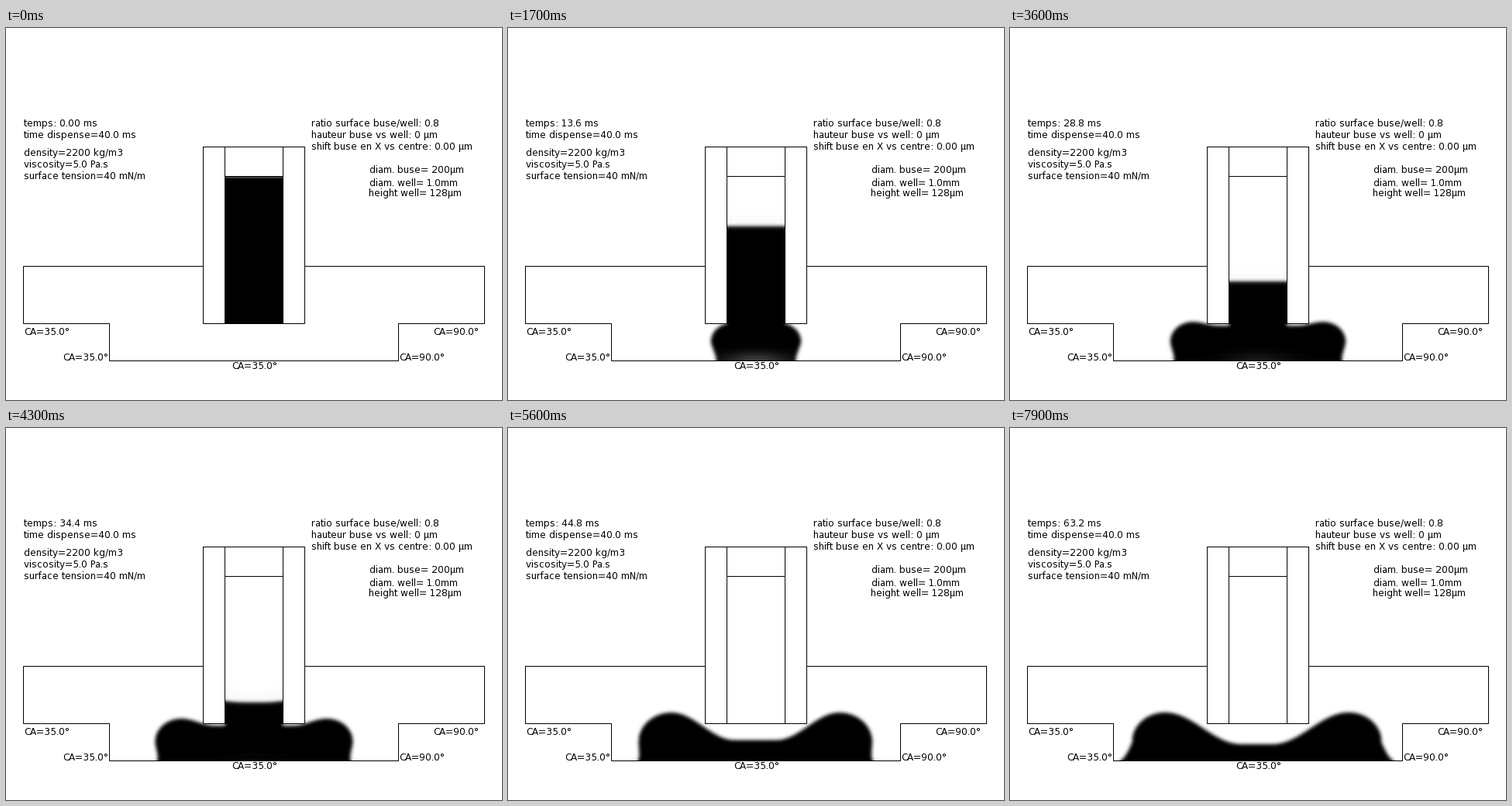
A matplotlib script that plays this animation: 640 by 480 pixels, repeating every 8000 ms.

```python
import numpy as np
import matplotlib.pyplot as plt
from matplotlib.animation import FuncAnimation

W, H, DPI = 640, 480, 100
FRAMES, STEP = 80, 100
TOP, LIP, FLOOR = 191, 381, 429   # initial level, nozzle outlet, well bottom
BORE, NOZZLE, WELL = 37.5, 65.5, 186
DRAINED = 5000                    # ms at which the nozzle is empty

plt.rcParams["text.hinting_factor"] = 1   # whole-pixel letter spacing

yy, xx = np.mgrid[0:H, 0:W] + 0.5
dx = np.abs(xx - 320)
above_lip = yy < LIP + 0.5
in_bore = (dx < BORE) & (yy > TOP + 0.5) & above_lip
walls = (dx > BORE) & (dx < NOZZLE) & above_lip
domain = ~walls & (yy < FLOOR + 0.5) & (above_lip | (dx < WELL))


def soft_step(d):
    return np.clip(d + 0.5, 0, 1)


def blur(a, sigma, r=7):
    k = np.exp(-0.5 * (np.arange(-r, r + 1) / sigma) ** 2)
    k /= k.sum()
    for _ in range(2):
        pad = np.pad(a, ((r, r), (0, 0)), mode="edge")
        a = sum(w * pad[i:i + len(a)] for i, w in enumerate(k)).T
    return a


def drop(t, x, y):
    """Liquid below the nozzle: a ring-shaped lobe around a sinking middle."""
    drain = 1 - np.exp(-max(t - DRAINED, 0) / 400)

    # constant flow: the covered area grows linearly
    reach = min(np.sqrt(BORE**2 + 4.96 * max(t - 1300, 0)), 161)
    ry = 24 + 0.006 * np.clip(t - 3300, 0, 3000) - 0.0025 * max(t - 6300, 0)
    rx = min(1.12 * ry, reach - 32)
    cx, cy = reach - rx, 405

    # upper surface
    middle, flat = LIP + 3 + 24 * drain, min(50 - 30 * drain, 0.8 * cx)
    u = np.clip((x - flat) / (cx - flat), 0, 1)
    inner = middle + (cy - ry - middle) * (1 - np.cos(np.pi * u)) / 2
    outer = cy - ry * np.sqrt(np.clip(1 - ((x - cx) / rx) ** 2, 0, 1))
    surface = np.where(x < cx, inner, outer)
    if t < DRAINED:
        surface = np.where(x < BORE, LIP - 6, surface)

    # side: tucked under while filling, sloping outwards once it relaxes
    lean = np.interp(t, [1000, 2000, 3600, 6300, 7900], [0, -13, -7, 0, 12])
    low = np.clip((y - cy) / (FLOOR - cy), 0, 1.2)
    side = reach + lean * low**1.2
    if t > 1300:
        side = side + 3 * np.exp(-np.clip(FLOOR - y, 0, None) / 3)
    else:
        # rounded tip on its way to the floor
        depth = 0.045 * t
        cap = np.clip(0.75 * depth, 1, 27)
        v = np.clip((y - LIP - depth + cap) / cap, 0, 1)
        side = side * (1 - v**2.4) ** (1 / 2.4)
    return soft_step(y - surface) * soft_step(side - x)


def column(t):
    """Liquid still inside the nozzle."""
    if t == 0:
        return np.where(yy < TOP + 3, 0.75, 1.0)
    rim = np.interp(t, [4000, 4900], [0, 6])
    depth = yy - (TOP + 1 + 0.0375 * t) + rim * ((dx / BORE) ** 3 - 0.4)
    body = 1 / (1 + np.exp(-np.clip(depth / 1.4, -40, 40)))
    return np.maximum(body, 0.04 * np.exp(np.minimum(depth, 0) / 10))


def liquid(t):
    axis = np.interp(t, [4900, 6300], [320, 318.5])
    rows = slice(340, 450)
    ink = np.zeros((H, W))
    ink[rows] = blur(drop(t, np.abs(xx[rows] - axis), yy[rows]),
                     np.interp(t, [0, 400], [0.3, 2.3]))
    if t < DRAINED:
        ink = np.where(in_bore, np.maximum(ink, column(t)), ink)
    # air caught under the drop
    air = 0.2 * np.interp(t, [1100, 1500, 2500, 4500], [0, 1.2, 1, 0])
    ink *= 1 - air * np.exp(-((xx - 320) / 42) ** 2 - ((yy - FLOOR) / 11) ** 2)
    return 1 - ink * domain


fig = plt.figure(figsize=(W / DPI, H / DPI), dpi=DPI, facecolor="white")
ax = fig.add_axes([0, 0, 1, 1])
ax.set(xlim=(0, W), ylim=(H, 0))
ax.axis("off")
image = ax.imshow(liquid(0), cmap="gray", vmin=0, vmax=1, extent=(0, W, H, 0),
                  interpolation="nearest", aspect="auto")


def line(*pts):
    ax.plot(*zip(*pts), color="black", lw=72 / DPI, snap=True,
            solid_joinstyle="miter", solid_capstyle="projecting")


def label(x, y, *lines):
    """Lines of text set 15 px apart, from baseline y down."""
    return [ax.text(x, y + 15 * i, s, family="DejaVu Sans", size=12 * 72 / DPI,
                    va="baseline", ha="left", color="black")
            for i, s in enumerate(lines)]


line((254, 307), (22, 307), (22, LIP), (133, LIP), (133, FLOOR),
     (506, FLOOR), (506, LIP), (617, LIP), (617, 307), (385, 307))
line((254, 153), (385, 153), (385, LIP), (254, LIP), (254, 153))
line((282, 153), (282, LIP))
line((357, 153), (357, LIP))
line((282, TOP), (357, TOP))

clock, _ = label(23, 127, "", "time dispense=40.0 ms")
label(23, 165, "density=2200 kg/m3", "viscosity=5.0 Pa.s",
      "surface tension=40 mN/m")
label(394, 127, "ratio surface buse/well: 0.8", "hauteur buse vs well: 0 µm",
      "shift buse en X vs centre: 0.00 µm")
label(469, 187, "diam. buse= 200µm")
label(469, 204, "diam. well= 1.0mm")
label(468, 217, "height well= 128µm")
for x, y, angle in [(23, 396, 35), (73, 429, 35), (291, 440, 35),
                    (551, 396, 90), (507, 429, 90)]:
    label(x, y, f"CA={angle:.1f}°")


def update(i):
    image.set_data(liquid(i * STEP))
    clock.set_text(f"temps: {0.8 * i:#.3g} ms")
    return image, clock


anim = FuncAnimation(fig, update, frames=FRAMES, interval=STEP,
                     init_func=lambda: update(0), repeat=True, repeat_delay=0)
plt.show()
```
